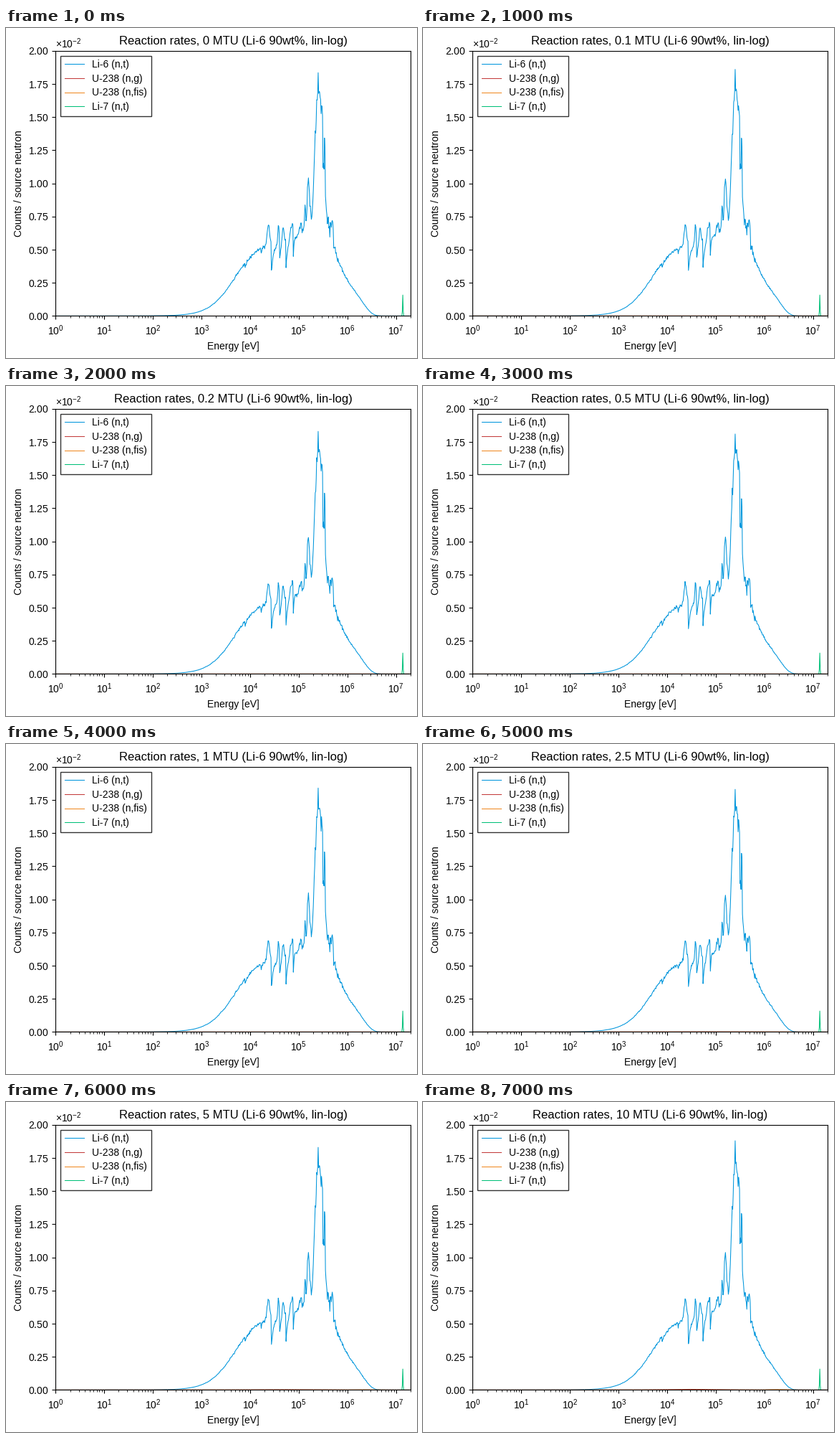
Write a matplotlib script that moves like this. It is 574 by 460 pixels and loops after 8 s.

```python
import numpy as np
import matplotlib.pyplot as plt
from matplotlib.animation import FuncAnimation
from matplotlib.ticker import MultipleLocator

W, H, DPI = 574, 460, 100
LEFT, BASE, AX_W, AX_H = 69.1, 401.4, 496.0, 369.6
BLUE, RED, ORANGE, GREEN = "#0096dc", "#c43c3c", "#f08a24", "#00c078"

MASSES = [0, 0.1, 0.2, 0.5, 1, 2.5, 5, 10]
MAXIMA = [18.35, 18.6, 18.3, 18.1, 18.4, 18.3, 18.3, 18.8]

# Resonances over u = log10(energy), rates in 1e-3
PEAKS = [  # centre, height, width
    (4.375, 1.5, 0.035), (4.585, 1.4, 0.02), (4.68, 1.1, 0.03),
    (4.84, 1.0, 0.03), (4.875, 1.0, 0.015), (5.04, 0.8, 0.04),
    (5.13, 1.7, 0.015), (5.2, 3.5, 0.035), (5.4, 1.75, 0.008),
    (5.535, 3.4, 0.01), (5.69, 1.6, 0.03),
]
DIPS = [  # sharp edge, depth, recovery length
    (3.9, 0.09, 0.03), (4.225, 0.11, 0.012), (4.435, 0.42, 0.045),
    (4.605, 0.28, 0.03), (4.735, 0.42, 0.03), (4.885, 0.42, 0.01),
    (5.065, 0.13, 0.01), (5.495, 0.27, 0.012), (5.665, 0.12, 0.01),
    (5.715, 0.25, 0.01),
]

plt.rcParams.update({
    "font.family": "Liberation Sans",
    "mathtext.fontset": "custom",
    "mathtext.rm": "Liberation Sans",
    "mathtext.default": "regular",
})


def bell(u, mid, width, power=2):
    return np.exp(-np.abs((u - mid) / width) ** power)


def lithium_rate(u):
    """Smooth rise, main hump, resonances and the fast cutoff."""
    rate = 5.7 / (1 + np.exp((3.68 - u) / 0.26))
    rate += 2 * bell(u, 5.45, 0.35) + 9 * bell(u, 5.42, 0.105, 3)
    past = np.maximum(u - 5.6, 0)
    rate *= np.exp(-1.9 * past - (past / 0.841) ** 6.5)
    for mid, height, width in PEAKS:
        rate += height * bell(u, mid, width)
    for edge, depth, length in DIPS:
        after = np.maximum(u - edge, 0)
        rate *= 1 - depth * np.exp(-after / length) * (u >= edge)
    return rate


u = np.arange(0, 7.31, 0.01)
energy = 10 ** u
grain = 0.011 + 0.022 * bell(u, 5.55, 0.4, 4)
at_peak = bell(u, 5.4, 0.02)
texture = np.random.default_rng(5).standard_normal(u.size)
lithium = lithium_rate(u) * (1 + grain * texture * (1 - at_peak))


def spectrum(i):
    """Lithium rate with the counting noise and maximum of step i."""
    noise = 0.008 * np.random.default_rng(40 + i).standard_normal(u.size)
    lift = MAXIMA[i] / lithium.max() - 1
    return 1e-3 * lithium * (1 + noise * (1 - at_peak) + lift * at_peak)


fig = plt.figure(figsize=((W + 0.001) / DPI, (H + 0.001) / DPI), dpi=DPI,
                 facecolor="white")
ax = fig.add_axes([LEFT / W, 1 - BASE / H, AX_W / W, AX_H / H])
ax.set_xscale("log")
ax.set_xlim(1, 2e7)
ax.set_ylim(0, 0.02)
ax.yaxis.set_major_locator(MultipleLocator(0.0025))
ax.ticklabel_format(axis="y", style="sci", scilimits=(0, 0), useMathText=True)
ax.tick_params(axis="x", pad=4.7)
ax.set_xlabel("Energy [eV]")
ax.set_ylabel("Counts / source neutron")
title = ax.set_title("")


def curve(label, colour, part=slice(None)):
    line, = ax.plot(energy[part], 0 * u[part], color=colour, lw=0.75, label=label)
    return line


li6 = curve("Li-6 (n,t)", BLUE)
capture = curve("U-238 (n,g)", RED)
fission = curve("U-238 (n,fis)", ORANGE)
fusion = (u > 7.115) & (u < 7.165)
li7 = curve("Li-7 (n,t)", GREEN, fusion)
li7.set_ydata(0.00158 * bell(u[fusion], 7.14, 0.008))
ax.legend(loc="upper left", fancybox=False, edgecolor="black", labelspacing=0.4)


def draw(i):
    mass = MASSES[i]
    title.set_text(f"Reaction rates, {mass:g} MTU (Li-6 90wt%, lin-log)")
    li6.set_ydata(spectrum(i))
    capture.set_ydata(5e-6 * mass * bell(u, 4.5, 0.7))
    fission.set_ydata(3e-6 * mass * bell(u, 6.27, 0.24))
    return title, li6, capture, fission


anim = FuncAnimation(fig, draw, frames=len(MASSES), interval=1000,
                     init_func=lambda: draw(0), repeat=True, repeat_delay=0)
plt.show()
```
